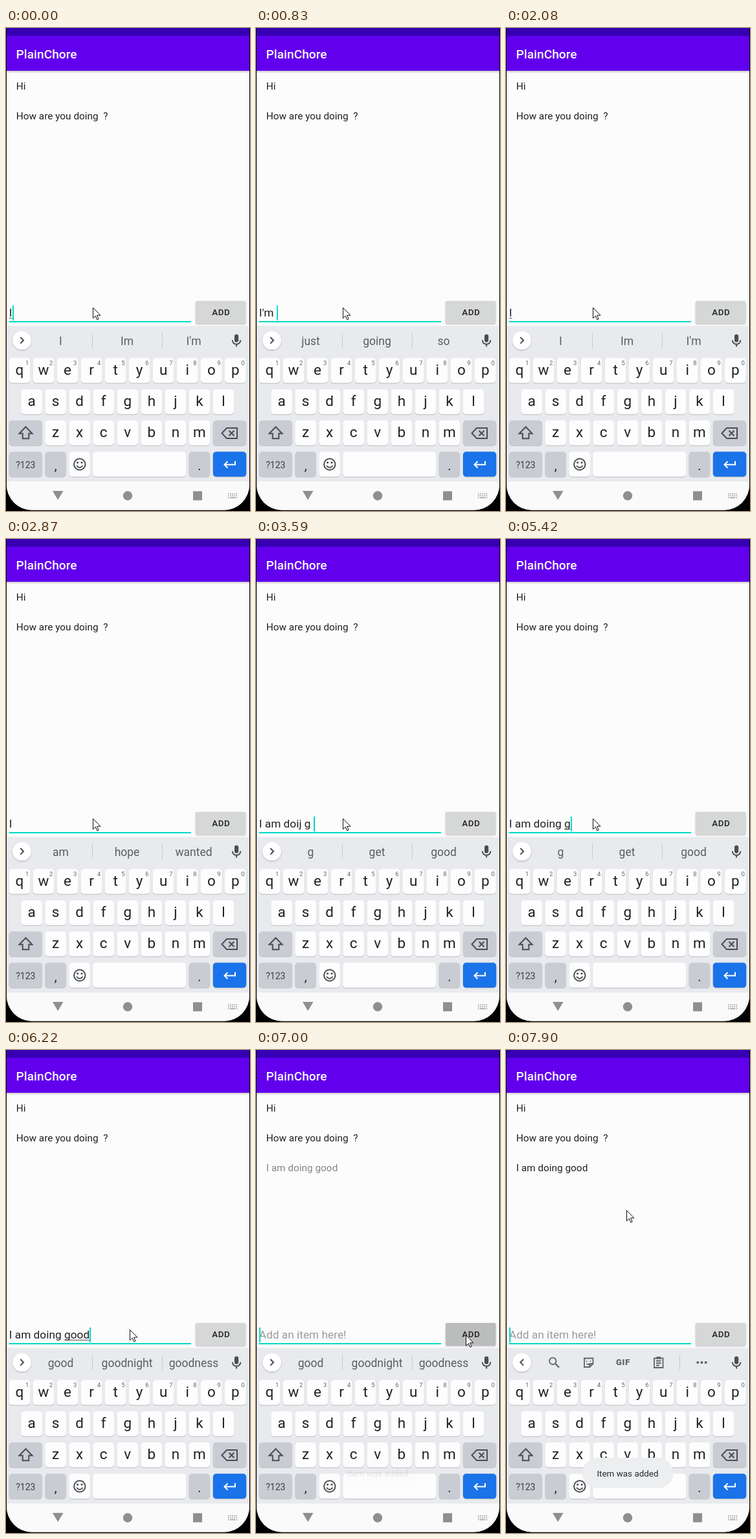
Recreate the animation shown at these times as an HTML page. Size 377 by 745 pixels, loop 8000 ms.

```html
<!DOCTYPE html>
<html lang="en">
<head>
<meta charset="utf-8">
<title>List app</title>
<style>
html, body { margin: 0; width: 100%; height: 100%; overflow: hidden; background: #000; }
#stage { position: absolute; left: 0; top: 0; width: 377px; height: 745px; overflow: hidden; font-family: Roboto, sans-serif; }
svg { position: absolute; left: 0; top: 0; display: block; }
svg text { white-space: pre; }
#field { position: absolute; left: 4.8px; top: 427px; height: 25px; line-height: 25px; font-size: 17.3px; color: #212121; white-space: pre; }
#word { text-decoration: underline 1px #555; text-underline-offset: 1.5px; text-decoration-skip-ink: none; }
#caret { position: absolute; top: 1px; width: 2px; height: 23px; background: #03dac5; }
#hint { position: absolute; left: 0; top: 0; color: #9b9b9b; }
.list { font-size: 15.38px; fill: #212121; }
.sugg { font-size: 17.5px; fill: #5a5e63; text-anchor: middle; }
.key { font-size: 22.5px; fill: #202124; text-anchor: middle; }
.num { font-size: 9.5px; fill: #5f6368; text-anchor: middle; }
.line { fill: none; stroke: #4a4d51; stroke-width: 2; }
.tool { fill: none; stroke: #5f6368; stroke-width: 1.8; }
</style>
</head>
<body>
<div id="stage">
<svg width="377" height="745" viewBox="0 0 377 745">
  <defs>
    <clipPath id="screen"><path d="M1 0H376V704A39 39 0 0 1 337 743.5H40A39 39 0 0 1 1 704Z"/></clipPath>
    <linearGradient id="shade" x2="0" y2="1">
      <stop stop-color="#000" stop-opacity=".2"/><stop offset="1" stop-color="#000" stop-opacity="0"/>
    </linearGradient>
    <filter id="soft" x="-20%" y="-20%" width="140%" height="150%">
      <feDropShadow dx="0" dy="1" stdDeviation="1" flood-opacity=".28"/>
    </filter>
  </defs>
  <rect width="377" height="745"/>
  <g clip-path="url(#screen)">
    <rect width="377" height="745" fill="#fcfcfc"/>
    <rect y="66" width="377" height="4" fill="url(#shade)"/>
    <rect width="377" height="66" fill="#6200ee"/>
    <rect width="377" height="12" fill="#3700b3"/>
    <text x="15.5" y="46.8" font-size="19.2" font-weight="500" fill="#fff">PlainChore</text>
    <g class="list">
      <text x="15.7" y="94.5">Hi</text>
      <text x="15.7" y="140.5">How are you doing  ?</text>
      <text x="15.7" y="186.5" id="item">I am doing good</text>
    </g>
    <rect x="4.5" y="452" width="281.5" height="2" fill="#03dac5"/>
    <rect id="button" x="293" y="421" width="77.5" height="35" rx="2" filter="url(#soft)"/>
    <text x="332.2" y="443.3" font-size="13.45" font-weight="500" letter-spacing=".5" text-anchor="middle" fill="#212121">ADD</text>
    <rect y="459.5" width="377" height="241" fill="#e8eaed"/>
    <rect y="699.5" width="377" height="46" fill="#fafafa"/>

    <circle cx="24.5" cy="481.8" r="14.3" fill="#fff" filter="url(#soft)"/>
    <path id="chevron" class="line"/>
    <g id="words">
      <path d="M133.5 470.5V493.5M241.5 470.5V493.5" stroke="#c6c9cd"/>
      <text class="sugg" x="84.5" y="488.5"></text>
      <text class="sugg" x="187" y="488.5"></text>
      <text class="sugg" x="290" y="488.5"></text>
    </g>
    <g id="tools" class="tool">
      <circle cx="72.3" cy="479.8" r="5.2"/><path d="M76.2 483.8L82 489.6" stroke-width="2.2"/>
      <path d="M121 475.5H134.5V484L129.5 489H121Z M134.5 484H129.5V489 M124.5 483.5Q127 486.5 130 483.5 M124.5 479.2V480.8 M130.5 479.2V480.8"/>
      <text x="181" y="486.3" font-size="13" font-weight="900" letter-spacing=".7" text-anchor="middle" fill="#5f6368" stroke="none">GIF</text>
      <path d="M229 475.5H242.5V490H229Z M232 479.5H239.5M232 483H239.5M232 486.5H237"/>
      <rect x="232.5" y="473" width="6.5" height="3.5" fill="#5f6368" stroke="none"/>
      <path d="M268.5 470.5V493.5" stroke="#c6c9cd" stroke-width="1"/>
      <g fill="#5f6368" stroke="none"><circle cx="296.3" cy="482" r="2"/><circle cx="302.5" cy="482" r="2"/><circle cx="308.7" cy="482" r="2"/></g>
    </g>
    <rect x="353" y="472.5" width="6.2" height="12" rx="3.1" fill="#4a4d51"/>
    <path class="line" stroke-width="1.8" d="M349.8 481.5A6.3 6.3 0 0 0 362.4 481.5M356.1 488V491.5"/>

    <g id="keys"></g>
    <path class="line" d="M30.5 615.2L20.5 625.5H25.7V633.2H35.3V625.5H40.5Z"/>
    <path class="line" d="M341 617H357V633H341L333.5 625ZM344.5 621L352.5 629M352.5 621L344.5 629"/>
    <circle class="line" cx="113.8" cy="673" r="8.7"/>
    <path class="line" d="M109 675Q113.8 681 118.6 675"/>
    <circle cx="110.6" cy="670.3" r="1.5" fill="#4a4d51"/><circle cx="117" cy="670.3" r="1.5" fill="#4a4d51"/>
    <path d="M354 668V673.5H337.5M342.5 668.5L337.5 673.5L342.5 678.5" fill="none" stroke="#fff" stroke-width="2"/>

    <g fill="#8f8f8f">
      <path d="M72 714H88.5L80.2 728Z"/>
      <circle cx="188" cy="721.5" r="7.2"/>
      <rect x="289" y="714.5" width="14" height="14"/>
      <path d="M343 718.5H357.5M343 721.5H357.5" stroke="#999" stroke-width="1.6" stroke-dasharray="1.7 1.4"/>
      <path d="M343 724.5H357.5" stroke="#999" stroke-width="1.6" stroke-dasharray="1.7 1.4 8.2 1.4"/>
    </g>
    <g id="toast">
      <rect x="118" y="629" width="140.5" height="47" rx="23.5" fill="#eceef0"/>
      <text x="188" y="657.7" font-size="13.45" text-anchor="middle" fill="#2b2b2b">Item was added</text>
    </g>
  </g>
</svg>
<div id="field"><span id="hint">Add an item here!</span><span id="text"></span><span id="word"></span><i id="caret"></i></div>
<svg width="377" height="745" viewBox="0 0 377 745">
  <path id="mouse" d="M0 0V16.2L3.8 12.6L6.3 18.4L8.6 17.4L6.1 11.7H11.4Z" fill="#fff" stroke="#111" stroke-linejoin="round"/>
</svg>
</div>
<script>
const $ = id => document.getElementById(id);
const PITCH = 37.05, LOOP = 8000;

function key(x, y, w, fill, label, style = '') {
  const h = 38.5;
  return `<rect x="${x}" y="${y + 1.2}" width="${w}" height="${h}" rx="5" fill="#000" opacity=".16"/>` +
    `<rect x="${x}" y="${y}" width="${w}" height="${h}" rx="5" fill="${fill}"/>` +
    `<text class="key" x="${x + w / 2}" y="${y + 25.7}" style="${style}">${label}</text>`;
}

function buildKeys() {
  const white = '#fdfdfe', gray = '#c9cdd3';
  let out = '';
  [['qwertyuiop', 4.6, 509], ['asdfghjkl', 23.3, 557.2], ['zxcvbnm', 60.3, 605.2]].forEach(([row, x, y], r) =>
    [...row].forEach((c, i) => {
      const left = x + i * PITCH;
      out += key(left, y, 32.6, white, c);
      if (!r) out += `<text class="num" x="${left + 28}" y="519.5">${(i + 1) % 10}</text>`;
    }));
  out += key(4.6, 605.2, 51.5, gray, '') + key(319.8, 605.2, 51.5, gray, '');
  const y = 653.6;
  out += key(4.6, y, 51.5, gray, '?123', 'font-size:14px;fill:#3c4043;transform:translateY(-.7px)');
  out += key(60.3, y, 32.6, gray, ',', 'font-size:20px;transform:translateY(2.5px)');
  out += key(97.3, y, 32.6, white, '') + key(134.2, y, 144, white, '');
  out += key(282.6, y, 32.6, gray, '.', 'font-size:20px;transform:translateY(2.5px)');
  out += key(319.8, y, 51.5, '#1a73e8', '');
  $('keys').innerHTML = out;
}

// Each step: start time and the values that change.
const steps = [
  [0, { text: '', word: 'I', caret: 1, sugg: "I|Im|I'm", mouse: [134.5, 431.5], item: 0, toast: 0, press: 0, tools: 0, hint: 0 }],
  [400, { word: 'Im' }],
  [680, { text: "I'm ", word: '' }],
  [830, { sugg: 'just|going|so' }],
  [1370, { text: '', word: 'Im' }],
  [1490, { word: 'I', sugg: "I|Im|I'm" }],
  [2080, { caret: 0 }],
  [2200, { text: 'I ', word: '', caret: 1 }],
  [2340, { sugg: 'am|hope|wanted' }],
  [2740, { caret: 0 }],
  [2880, { word: 'a', caret: 1 }],
  [3020, { sugg: 'a|am|and' }],
  [3170, { word: 'am' }],
  [3310, { text: 'I am ', word: 'do', sugg: 'am|an|any' }],
  [3450, { word: 'doij', sugg: 'do|doing|dog' }],
  [3590, { text: 'I am doij g ', word: '', sugg: 'g|get|good' }],
  [3740, { text: 'I am doij ', word: 'g' }],
  [3880, { word: '' }],
  [4020, { text: 'I am ', word: 'doij', sugg: 'do|doing|dog' }],
  [4160, { word: 'doi' }],
  [4310, { word: 'doin' }],
  [4430, { word: 'doing', sugg: 'doing|going|doings' }],
  [4560, { word: 'doing', tail: ' ' }],
  [4840, { text: 'I am doing ', word: '', sugg: 'good|well|great' }],
  [5270, { word: 'g', sugg: 'g|get|good' }],
  [5450, { word: 'go' }],
  [5640, { word: 'goo', sugg: 'good|going|goods' }],
  [5820, { word: 'good', sugg: 'good|goodnight|goodness' }],
  [6220, { mouse: [191.5, 431.5] }],
  [6370, { mouse: [257, 435] }],
  [6490, { mouse: [311, 439] }],
  [6620, { mouse: [324.5, 440] }],
  [6740, { press: 1 }],
  [6870, { text: '', word: '', hint: 1, item: .15 }],
  [7000, { item: .55, toast: .1 }],
  [7120, { item: .85, toast: .45 }],
  [7240, { item: 1, toast: .8, press: 0 }],
  [7360, { toast: 1, tools: 1, mouse: [318, 428] }],
  [7500, { mouse: [288, 378] }],
  [7640, { mouse: [244, 315] }],
  [7770, { mouse: [206, 264] }],
  [7900, { mouse: [186.5, 247.5] }]
];

const words = [...document.querySelectorAll('.sugg')];
const tail = document.createElement('span');
$('field').insertBefore(tail, $('caret'));

function show(s) {
  $('text').textContent = s.text;
  $('word').textContent = s.word;
  tail.textContent = s.tail || '';
  $('caret').style.visibility = s.caret ? 'visible' : 'hidden';
  $('hint').style.display = s.hint ? '' : 'none';
  s.sugg.split('|').forEach((w, i) => words[i].textContent = w);
  $('words').style.display = s.tools ? 'none' : '';
  $('tools').style.display = s.tools ? '' : 'none';
  $('chevron').setAttribute('d', s.tools ? 'M27 477L22.2 481.8L27 486.6' : 'M22.2 477L27 481.8L22.2 486.6');
  $('item').style.opacity = s.item;
  $('toast').style.opacity = s.toast;
  $('button').setAttribute('fill', s.press ? '#bbbdbc' : '#d6d7d7');
  $('mouse').setAttribute('transform', `translate(${s.mouse})`);
}

let last = -1;
function tick() {
  const t = performance.now() % LOOP;
  const n = steps.filter(s => s[0] <= t).length;
  if (n !== last) {
    const state = {};
    for (const [, patch] of steps.slice(0, n)) Object.assign(state, { tail: '' }, patch);
    show(state);
    last = n;
  }
  requestAnimationFrame(tick);
}

buildKeys();
tick();
</script>
</body>
</html>
```
